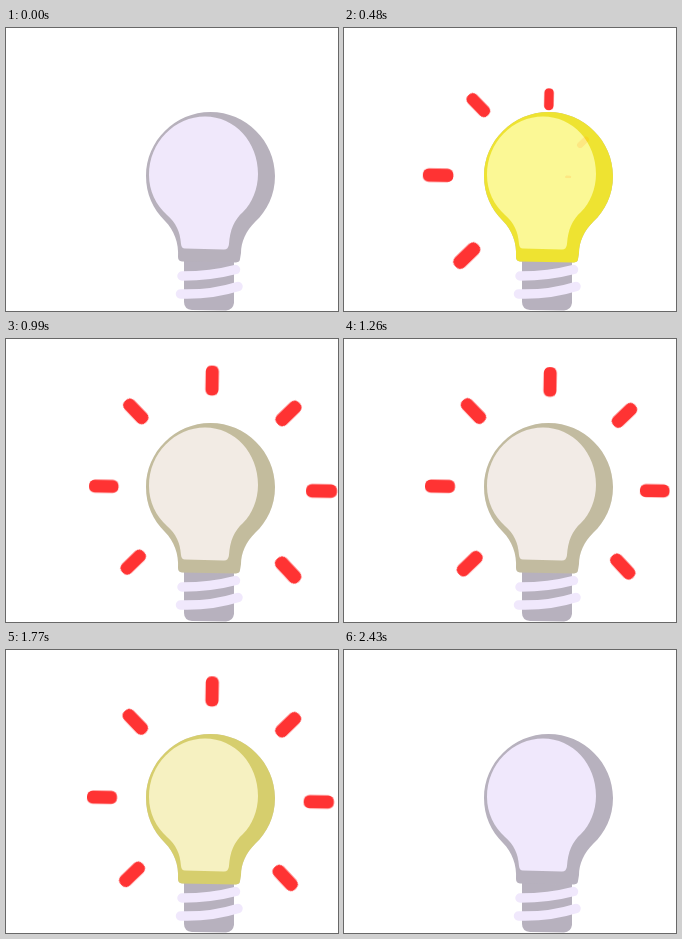
Animation of 332x283 px, one loop 2820 ms. Source, as an HTML page without scripts:

```html
<!DOCTYPE html>
<html lang="en">
<head>
<meta charset="utf-8">
<title>Light bulb</title>
<style>
  html, body { margin: 0; width: 100%; height: 100%; overflow: hidden; background: #fff; }
  svg { display: block; width: 100%; height: 100%; }

  :root {
    --loop: 2820ms;
    --sine-out: cubic-bezier(.39, .575, .565, 1);
    --sine-in: cubic-bezier(.47, 0, .745, .715);
    --sine: cubic-bezier(.37, 0, .63, 1);
  }

  .rays { fill: #ff3333; animation: show var(--loop) linear infinite; }
  .ray {
    transform-origin: 202px 148px;
    animation: pop var(--loop) linear calc(var(--i) * 83.3ms) infinite backwards;
  }
  .lit { animation: glow var(--loop) linear infinite; }

  .shade { fill: #b7b1be; }
  .pale { fill: #f0e8fc; }
  .thread { fill: none; stroke: #f0e8fc; stroke-width: 9.5; stroke-linecap: round; }

  /* Rays stay hidden until the delayed ones have been reset */
  @keyframes show {
    0%, 4.25% { opacity: 0; }
    4.26%, 81.91% { opacity: 1; }
    86.17%, 100% { opacity: 0; }
  }

  /* Quick growth, then a damped swing around full size */
  @keyframes pop {
    0% { transform: scale(0); }
    6.74% { transform: scale(.595); }
    9.22% { transform: scale(.81); }
    11.7% { transform: scale(.965); }
    12.66% { transform: scale(1); animation-timing-function: var(--sine-out); }
    18.62% { transform: scale(1.045); animation-timing-function: var(--sine-in); }
    27.66% { transform: scale(1); animation-timing-function: var(--sine-out); }
    34.04% { transform: scale(.982); animation-timing-function: var(--sine-in); }
    42.66% { transform: scale(1); animation-timing-function: var(--sine-out); }
    48.6% { transform: scale(1.0075); animation-timing-function: var(--sine); }
    57.7%, 86.17% { transform: scale(1); }
    86.18%, 100% { transform: scale(0); }
  }

  @keyframes glow {
    0% { opacity: 0; }
    8.87% { opacity: 1; }
    13.83% { opacity: 1; animation-timing-function: var(--sine); }
    43.26% { opacity: .17; animation-timing-function: cubic-bezier(.3, .25, .6, 1); }
    77.66%, 81.91% { opacity: .65; }
    86.17%, 100% { opacity: 0; }
  }
</style>
</head>
<body>
<svg viewBox="0 0 332 283">
  <defs>
    <rect id="bar" x="-15" y="-6.6" width="30" height="13.2" rx="5.8"/>
    <path id="glass" d="M204.5 84C240 84 269 113 269 148C269 167 261 183 249 194C240 203 235 214 235 225L234 231Q234 234 230 234.5L176 233.5Q172 233 172 229C173 215 168 202 159 193C147 181 140 166 140 148C140 113 169 84 204.5 84Z"/>
    <path id="core" d="M199 88.5C229 88.5 252 114 252 146C252 161 246 175 237 184C228 192 224 202 223 216Q222.5 221.5 218 221.5L179 220.5Q175.5 220.5 175 216C174 203 170 195 161 187C150 177 143 163 143 147C143 114 169 88.5 199 88.5Z"/>
  </defs>

  <g class="rays">
    <g class="ray" style="--i:0"><use href="#bar" transform="translate(126 224.3) rotate(-44)"/></g>
    <g class="ray" style="--i:1"><use href="#bar" transform="translate(96 147.2) rotate(1)"/></g>
    <g class="ray" style="--i:2"><use href="#bar" transform="translate(129.3 71.8) rotate(46)"/></g>
    <g class="ray" style="--i:3"><use href="#bar" transform="translate(206.2 41.6) rotate(91)"/></g>
    <g class="ray" style="--i:4"><use href="#bar" transform="translate(281.8 75) rotate(-44)"/></g>
    <g class="ray" style="--i:5"><use href="#bar" transform="translate(312 151.8) rotate(1)"/></g>
    <g class="ray" style="--i:6"><use href="#bar" transform="translate(278.8 227.5) rotate(47)"/></g>
  </g>

  <path class="shade" d="M178 231L228 232V275Q227 282 220 282.5L186 282Q178 281 178 274Z"/>
  <use href="#glass" class="shade"/>
  <use href="#core" class="pale"/>
  <g class="lit">
    <use href="#glass" fill="#f4e923"/>
    <use href="#core" fill="#fdfa8b"/>
  </g>
  <path class="thread" d="M176 248Q205 248 229.5 241.5"/>
  <path class="thread" d="M174.5 266Q205 267 232 258.5"/>
</svg>
</body>
</html>
```
